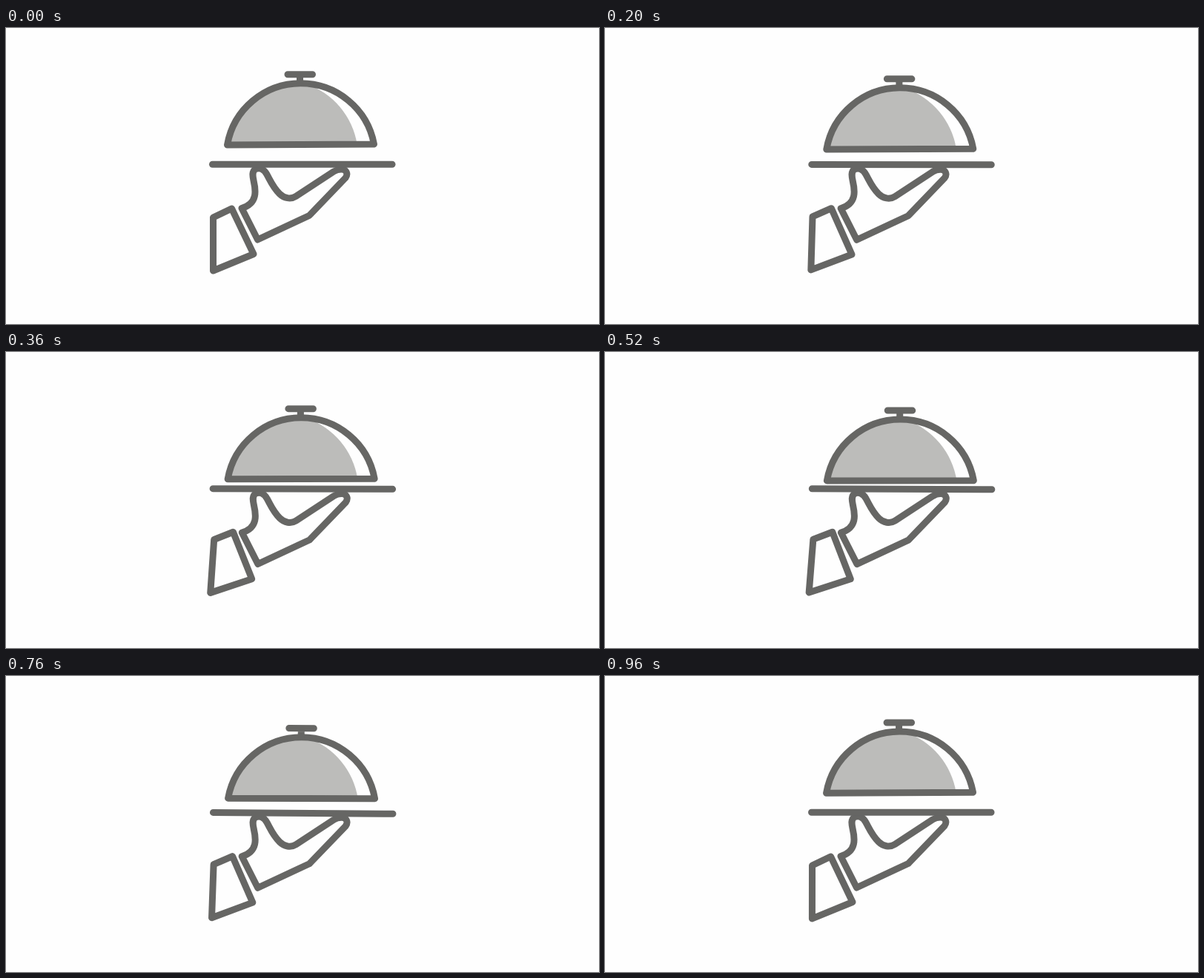
Recreate the animation shown at these times as an HTML page. Size 800 by 400 pixels, loop 1000 ms.

```html
<!DOCTYPE html>
<html lang="en">
<head>
<meta charset="utf-8">
<title>Serving cloche</title>
<style>
  html, body { margin: 0; width: 100%; height: 100%; overflow: hidden; background: #fefefe; }
  svg { display: block; width: 100%; height: 100%; }
</style>
</head>
<body>
<svg viewBox="0 0 800 400" fill="none" stroke="#666664" stroke-width="9" stroke-linecap="round" stroke-linejoin="round">
  <path id="cuff" d="M279.5 256L304.5 244L334 305.5L279.5 328Z"/>
  <path id="hand" d="M318 243.5L339.5 286L409 253.5L458 202.5C462 197 459 190.5 452 191Q447 191 442 194L391 227.5C384 232 375 230 369 224C360 215 357 207 352 198C348 190 341 188 336 191C332 194 332.5 199 334 206C337 219 340 237 318 243.5Z"/>
  <g id="top">
    <path d="M278.5 184.2H521"/>
    <g id="lid">
      <path d="M298.5 158A100.6 100.6 0 0 1 405 75.5A104 104 0 0 1 473.6 157Z" fill="#bcbcba" stroke="none"/>
      <path d="M298.5 158A100.6 100.6 0 0 1 496.5 157Z"/>
      <path d="M380 62.7H413.5M396.5 63V74"/>
    </g>
  </g>
</svg>
<script>
const LOOP = 1000, STEP = 40;
const el = id => document.getElementById(id);
const cuff = el('cuff'), hand = el('hand'), plate = el('top'), lid = el('lid');
const ease = x => (1 - Math.cos(Math.PI * x)) / 2;

// keys: [time, value] pairs, eased between neighbours
function tween(t, keys) {
  const i = keys.findIndex(k => k[0] > t);
  const [t0, a] = keys[i - 1], [t1, b] = keys[i];
  return a + (b - a) * ease((t - t0) / (t1 - t0));
}

const DIP = [[0, 0], [480, 1], [LOOP, 0]];
const TILT = [[0, 0], [480, .18], [640, .58], [LOOP, 0]];

function draw(now) {
  const t = Math.floor(now % LOOP / STEP) * STEP;
  const dip = tween(t, DIP), tilt = tween(t, TILT);
  const sink = `translate(${.4 * dip} ${.6 * dip})`;
  cuff.setAttribute('transform', `rotate(${4.6 * dip} 316 272)`);
  hand.setAttribute('transform', sink);
  plate.setAttribute('transform', `${sink} rotate(${tilt} 285 285)`);
  lid.setAttribute('transform', `translate(0 ${15.5 * dip})`);
}

const start = performance.now();
function loop() {
  draw(performance.now() - start);
  requestAnimationFrame(loop);
}
loop();
</script>
</body>
</html>
```
